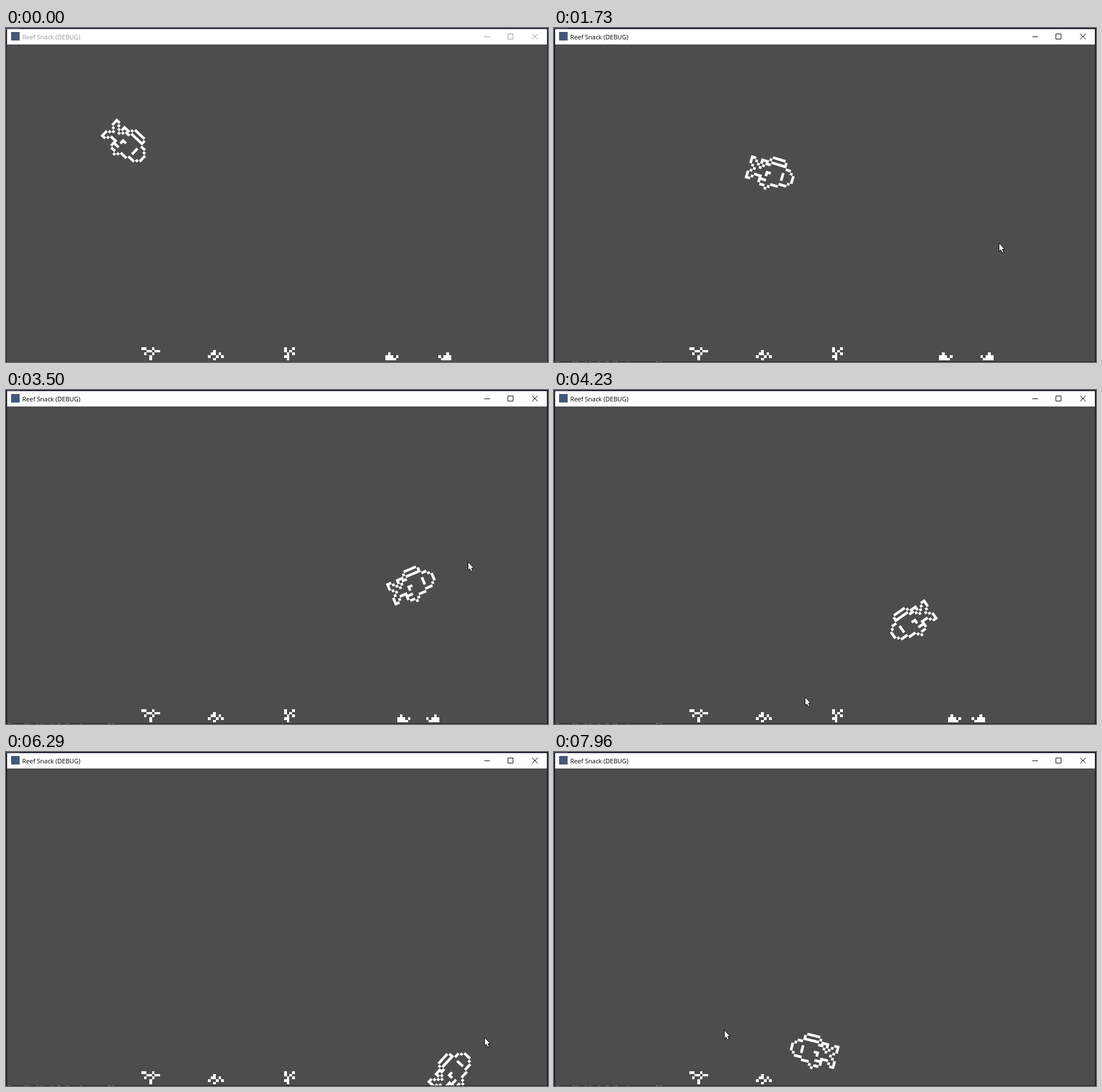
An HTML page with a canvas for the animation above (7990 ms loop, 953 by 588 pixels).

```html
<!DOCTYPE html>
<html>
<head>
<meta charset="utf-8">
<style>
html, body { margin: 0; width: 100%; height: 100%; overflow: hidden; background: #1f2030; }
canvas { display: block; }
</style>
</head>
<body>
<canvas id="stage" width="953" height="588"></canvas>
<script>
const ctx = document.getElementById('stage').getContext('2d');
const LOOP = 7990, CELL = 4.65, FLOOR = 585.4, CRAB_SPEED = .00605;
const FOCUS = 250, CURSOR_IN = 430;

const FISH = [
  '        #####     ',
  '       #     #    ',
  '##  ### ######    ',
  '# # # ##      ##  ',
  '#  # #          # ',
  ' #  #        #   #',
  '  #    ##    #   #',
  ' #     #     #   #',
  '#  ###          # ',
  '# #  ###     ###  ',
  '##   #    ###     ',
  '      ## #        ',
  '        #         '
];
const SHRUB = ['##  #  ', '  ## ##', ' #  #  ', '   #   ', '   #   '];
const WEED = ['  #   ', ' ## # ', '#  # #', '  #   '];
const CORAL = ['#  #', '# # ', ' # #', '##  ', ' #  '];
const CRAB = [' #   ', '### #', '#### '];
const mirror = rows => rows.map(row => [...row].reverse().join(''));

const floorLife = [
  { rows: SHRUB, x: 238 },
  { rows: WEED, x: 355 },
  { rows: CORAL, x: 489, eaten: 7560 },
  { rows: CRAB, x: 667, speed: CRAB_SPEED, eaten: 5700 },
  { rows: mirror(CRAB), x: 760, speed: -CRAB_SPEED, eaten: 5800 }
];

// Turning points as [time, x, y], joined by smooth curves.
const fishPath = [
  [960, 211, 203], [1730, 381, 256], [2750, 570, 314], [3650, 722, 352],
  [4230, 629, 409], [4900, 537, 503], [5440, 611, 544], [6290, 784, 564],
  [6420, 796, 556], [6870, 705, 546], [7960, 457, 528]
];
const cursorPath = [
  [430, 511, 483], [1190, 730, 300], [1730, 782, 378], [2750, 826, 511],
  [3150, 861, 390], [3680, 765, 284], [4230, 441, 540], [4370, 433, 546],
  [5440, 777, 553], [6290, 841, 502], [6440, 866, 491], [7670, 412, 505], [7960, 299, 489]
];

function slope(path, i, axis) {
  const rate = j => (path[j + 1][axis] - path[j][axis]) / (path[j + 1][0] - path[j][0]);
  if (i === 0) return rate(0);
  if (i === path.length - 1) return rate(i - 1);
  const a = rate(i - 1), b = rate(i);
  return a * b > 0 ? 2 * a * b / (a + b) : 0;
}

function along(path, time) {
  const t = Math.max(time, path[0][0]);
  let i = 0;
  while (i < path.length - 2 && t >= path[i + 1][0]) i++;
  const p = path[i], q = path[i + 1], span = q[0] - p[0];
  const u = (t - p[0]) / span, v = 1 - u;
  return [1, 2].map(k =>
    v * v * (1 + 2 * u) * p[k] + u * u * (3 - 2 * u) * q[k] +
    span * u * v * (v * slope(path, i, k) - u * slope(path, i + 1, k)));
}

function sprite(rows, x, y, at = n => n) {
  ctx.beginPath();
  rows.forEach((row, r) => [...row].forEach((cell, c) => {
    if (cell !== '#') return;
    const left = at(x + c * CELL), top = at(y + r * CELL);
    ctx.rect(left, top, at(x + (c + 1) * CELL) - left, at(y + (r + 1) * CELL) - top);
  }));
  ctx.fillStyle = '#fff';
  ctx.fill();
}

function box(color, x, y, w, h) {
  ctx.fillStyle = color;
  ctx.fillRect(x, y, w, h);
}

function drawWindow(focused) {
  box('#1f2030', 0, 0, 953, 588);
  box('#53657c', 0, 0, 24, 1);
  ctx.font = '12px "DejaVu Sans Mono", monospace';
  ctx.fillStyle = '#b4b6c0';
  ctx.fillText('OpenGL ES 3.0 Renderer: 42', 3, 595);
  if (!focused) box('#44455a', 1, 1, 951, 587);
  box('#fff', 2, 2, 949, 27);
  box('#4d4d4d', 2, 29, 949, 558);

  box('#46587a', 9, 7, 15, 15);
  const ink = focused ? '#000' : '#999';
  ctx.fillStyle = ink;
  ctx.font = '11px "Open Sans", "Noto Sans", sans-serif';
  ctx.fillText('Reef Snack (DEBUG)', 28.5, 20);
  ctx.strokeStyle = ink;
  ctx.lineWidth = 1;
  ctx.beginPath();
  ctx.moveTo(841, 15.5); ctx.lineTo(851, 15.5);
  ctx.rect(882.5, 10.5, 9, 9);
  ctx.moveTo(925, 10); ctx.lineTo(935, 20);
  ctx.moveTo(935, 10); ctx.lineTo(925, 20);
  ctx.stroke();
}

// The fish always faces the cursor.
function drawFish([x, y], [tx, ty]) {
  ctx.save();
  ctx.translate(x, y);
  ctx.scale(tx < x ? -1 : 1, 1);
  ctx.rotate(Math.atan2(ty - y, Math.abs(tx - x)));
  sprite(FISH, -9 * CELL, -6.5 * CELL);
  ctx.restore();
}

function drawCursor([x, y]) {
  ctx.save();
  ctx.translate(Math.round(x) + .5, Math.round(y) + .5);
  ctx.beginPath();
  [[0, 0], [0, 15], [3, 12], [5.5, 17], [8, 16], [6, 11], [10, 11]].forEach(p => ctx.lineTo(...p));
  ctx.closePath();
  ctx.fillStyle = '#fff';
  ctx.fill();
  ctx.strokeStyle = '#000';
  ctx.stroke();
  ctx.restore();
}

function draw(t) {
  const cursor = along(cursorPath, t);
  drawWindow(t >= FOCUS);
  ctx.save();
  ctx.beginPath();
  ctx.rect(2, 29, 949, 558);
  ctx.clip();
  for (const { rows, x, speed = 0, eaten = LOOP } of floorLife) {
    if (t < eaten) sprite(rows, x + speed * t, FLOOR - rows.length * CELL, Math.round);
  }
  drawFish(along(fishPath, t), cursor);
  ctx.restore();
  if (t >= CURSOR_IN) drawCursor(cursor);
}

const start = performance.now();
function tick() {
  draw((performance.now() - start) % LOOP);
  requestAnimationFrame(tick);
}
tick();
</script>
</body>
</html>
```
